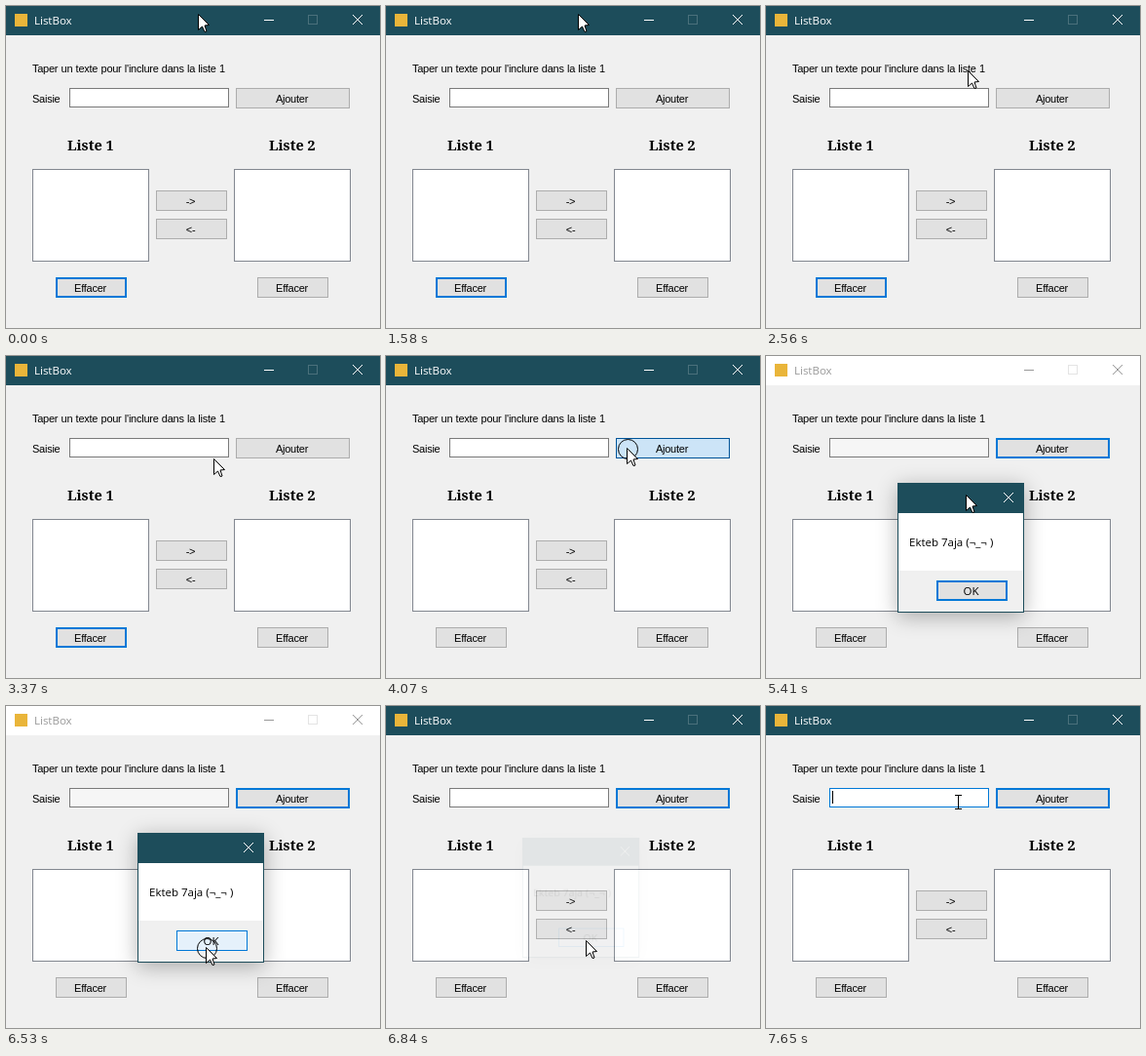
An HTML page with a canvas that plays this animation: 384 px wide and 330 px high, repeating every 8 s.

```html
<!DOCTYPE html>
<html lang="fr">
<head>
<meta charset="utf-8">
<title>ListBox</title>
<style>
  html, body { margin: 0; width: 100%; height: 100%; overflow: hidden; background: #f0f0f0; }
  canvas { display: block; width: 384px; height: 330px; }
</style>
</head>
<body>
<canvas id="stage" width="384" height="330"></canvas>
<script>
const page = document.getElementById('stage').getContext('2d');
const layer = Object.assign(document.createElement('canvas'), { width: 384, height: 330 });
const panel = layer.getContext('2d');
let ctx = page;

const LOOP = 8000;
const TEAL = '#1d4d5b', BLUE = '#0078d7', FACE = '#f0f0f0';
const UI = '11px "Liberation Sans", Arial, sans-serif';
const CAPTION = '11.5px "Open Sans", sans-serif';
const HEADING = 'bold 14.5px "Noto Serif", serif';

const ADD = { press: 4030, release: 4370 };
const OK = { press: 6530, release: 6700 };
const OPENED = 4740, CLOSING = 6740, CLOSED = 6860;

const HOME = { x: 197, y: 8 };
const MOVES = [
  { from: 1990, to: 2080, x: 191, y: 22 },
  { from: 2340, to: 2560, x: 207, y: 66 },
  { from: 2560, to: 3140, x: 238, y: 98 },
  { from: 3230, to: 3370, x: 213, y: 105 },
  { from: 3590, to: 3950, x: 247, y: 94 },
  { from: 4890, to: 5030, x: 228, y: 119 },
  { from: 5160, to: 5410, x: 205, y: 142 },
  { from: 5410, to: 5920, x: 199, y: 251 },
  { from: 6010, to: 6090, x: 205, y: 247 },
  { from: 6750, to: 7420, x: 197, y: 98 }
];

const between = (t, from, to) => t >= from && t < to;
const progress = (t, from, to) => Math.min(1, Math.max(0, (t - from) / (to - from)));
const ease = k => k * k * (3 - 2 * k);
const inside = (p, x, y, w, h) => between(p.x, x, x + w) && between(p.y, y, y + h);
const held = (t, click) => between(t, click.press, click.release);

// Each move carries the pointer on from where the previous one left it.
function pointerAt(t) {
  let { x, y } = HOME;
  for (const move of MOVES) {
    const k = ease(progress(t, move.from, move.to));
    x += (move.x - x) * k;
    y += (move.y - y) * k;
  }
  return { x: Math.round(x), y: Math.round(y) };
}

function fill(x, y, w, h, color) {
  ctx.fillStyle = color;
  ctx.fillRect(x, y, w, h);
}

function box(x, y, w, h, border, face, line = 1) {
  fill(x, y, w, h, border);
  fill(x + line, y + line, w - 2 * line, h - 2 * line, face);
}

function text(string, x, y, font, color = '#000', align = 'left') {
  ctx.font = font;
  ctx.letterSpacing = font === UI ? '-0.25px' : '0px';
  ctx.wordSpacing = font === UI ? '0.5px' : '0px';
  ctx.textAlign = align;
  ctx.fillStyle = color;
  ctx.fillText(string, x, y);
}

const BUTTON = {
  normal: { border: '#adadad', face: '#e1e1e1', line: 1 },
  focused: { border: BLUE, face: '#e1e1e1', line: 2 },
  hover: { border: BLUE, face: '#e5f1fb', line: 1 },
  pressed: { border: '#005499', face: '#cce4f7', line: 1 }
};

function button(label, x, y, w, state = 'normal', font = UI) {
  const { border, face, line } = BUTTON[state];
  box(x, y, w, 21, border, face, line);
  text(label, x + w / 2 - 1, y + 15, font, '#000', 'center');
}

function cross(x, y, color) {
  ctx.strokeStyle = color;
  ctx.lineWidth = 1;
  ctx.beginPath();
  ctx.moveTo(x, y);
  ctx.lineTo(x + 10, y + 10);
  ctx.moveTo(x + 10, y);
  ctx.lineTo(x, y + 10);
  ctx.stroke();
}

function titleBar(active) {
  const bar = active ? TEAL : '#fff';
  const ink = active ? '#fff' : '#999';
  fill(0, 0, 384, 30, bar);
  fill(9, 8, 13, 13, '#e9b53a');
  text('ListBox', 29, 19, CAPTION, ink);
  fill(265, 14, 10, 1, ink);
  box(310, 9, 10, 10, active ? '#4a707b' : '#e4e4e4', bar);
  cross(356, 9, ink);
}

function input(t) {
  const focused = between(t, ADD.release, OPENED) || t >= CLOSED;
  const behindDialog = between(t, OPENED, CLOSING);
  box(65, 84, 164, 20, focused ? BLUE : '#7a7a7a', behindDialog ? '#f6f6f6' : '#fff');
  const blink = (t - CLOSED) % 1060 < 530 || t >= 7650;
  if (t >= CLOSED && blink) fill(68, 87, 1, 13, '#000');
}

function addState(t, pointer) {
  if (held(t, ADD)) return 'pressed';
  if (t >= ADD.release) return 'focused';
  return inside(pointer, 236, 84, 117, 21) ? 'hover' : 'normal';
}

function form(t, pointer) {
  fill(0, 0, 384, 330, FACE);
  titleBar(!between(t, ADD.release, CLOSING));
  text("Taper un texte pour l'inclure dans la liste 1", 27, 68, UI);
  text('Saisie', 27, 99, UI);
  input(t);
  button('Ajouter', 236, 84, 117, addState(t, pointer));
  for (const column of [0, 1]) {
    const x = 27 + 207 * column;
    text('Liste ' + (column + 1), x + 36, 148, HEADING);
    box(x, 167, 120, 95, '#828790', '#fff');
    button('Effacer', x + 24, 278, 73, column === 0 && t < ADD.press ? 'focused' : 'normal');
  }
  ['->', '<-'].forEach((label, row) => button(label, 154, 189 + 29 * row, 73));
}

function okState(t, pointer) {
  if (between(t, OK.press + 50, OK.release)) return 'pressed';
  return inside(pointer, 175, 230, 73, 22) ? 'hover' : 'focused';
}

function dialogContent(t, pointer) {
  ctx.clearRect(0, 0, 384, 330);
  ctx.shadowColor = 'rgba(0, 0, 0, 0.3)';
  ctx.shadowBlur = 20;
  ctx.shadowOffsetY = 4;
  fill(135, 130, 130, 133, TEAL);
  ctx.shadowColor = 'transparent';
  fill(136, 161, 128, 59, '#fff');
  fill(136, 220, 128, 42, FACE);
  cross(244, 140, '#fff');
  text('Ekteb 7aja (¬_¬ )', 147, 195, CAPTION);
  button('OK', 175, 230, 73, okState(t, pointer), CAPTION);
}

// The dialog is composed on its own layer so that it fades as one piece.
function dialog(t, pointer) {
  const shown = ease(progress(t, 4550, OPENED) - progress(t, CLOSING, CLOSED));
  if (!shown) return;
  ctx = panel;
  dialogContent(t, pointer);
  ctx = page;
  const scale = 0.92 + 0.08 * shown;
  ctx.save();
  ctx.globalAlpha = shown;
  ctx.translate(200 * (1 - scale), 196.5 * (1 - scale));
  ctx.scale(scale, scale);
  ctx.drawImage(layer, 0, 0);
  ctx.restore();
}

const ARROW = new Path2D('M0 0V16L4 12.5L6.5 18L8.5 17.5L6.5 11.5L11 11Z');

function arrow({ x, y }) {
  ctx.save();
  ctx.translate(x + 0.5, y + 0.5);
  ctx.lineJoin = 'round';
  ctx.fillStyle = '#fff';
  ctx.fill(ARROW);
  ctx.strokeStyle = '#000';
  ctx.lineWidth = 1;
  ctx.stroke(ARROW);
  ctx.restore();
}

function textCursor({ x, y }) {
  fill(x, y - 7, 1, 15, '#000');
  for (const end of [y - 7, y + 7]) {
    fill(x - 3, end, 3, 1, '#000');
    fill(x + 1, end, 3, 1, '#000');
  }
}

function clickRing({ x, y }) {
  ctx.strokeStyle = '#000';
  ctx.lineWidth = 1;
  ctx.beginPath();
  ctx.arc(x + 1.5, y + 1.5, 10, 0, 2 * Math.PI);
  ctx.stroke();
}

function draw(t) {
  const pointer = pointerAt(t);
  form(t, pointer);
  dialog(t, pointer);
  if (held(t, ADD) || held(t, OK)) clickRing(pointer);
  (inside(pointer, 65, 84, 164, 20) ? textCursor : arrow)(pointer);
}

const start = performance.now();
function tick() {
  draw((performance.now() - start) % LOOP);
  requestAnimationFrame(tick);
}
tick();
</script>
</body>
</html>
```
